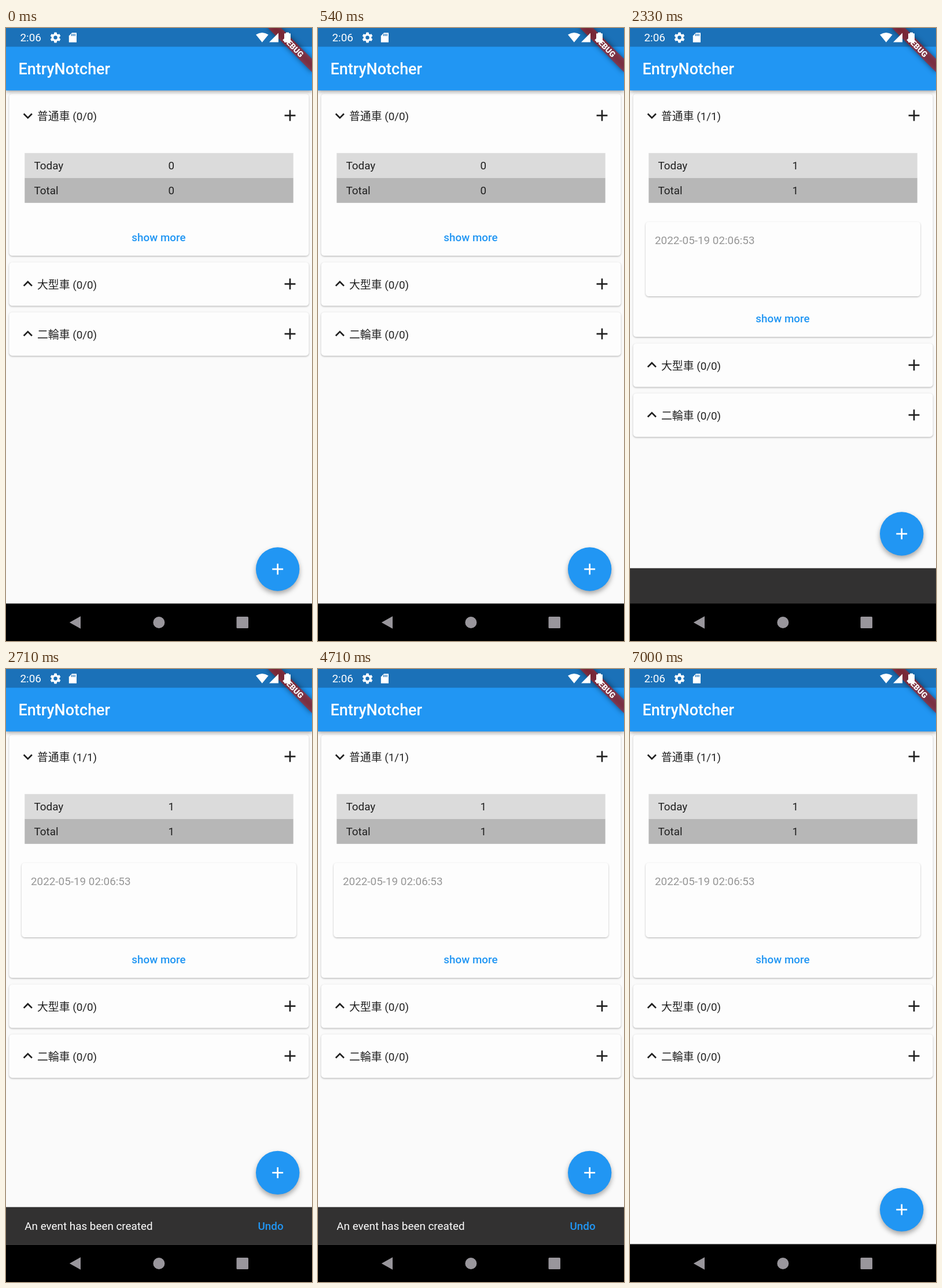
An HTML page with a canvas that plays this animation: 529x1058 px, repeating every 7040 ms.

```html
<!DOCTYPE html>
<html lang="ja">
<head>
<meta charset="utf-8">
<title>EntryNotcher</title>
<style>
  html, body { margin: 0; width: 100%; height: 100%; overflow: hidden; background: #000; }
  canvas { display: block; width: 529px; height: 1058px; }
</style>
</head>
<body>
<canvas id="stage" width="529" height="1058"></canvas>
<script>
const ctx = document.getElementById('stage').getContext('2d');
const W = 529, H = 1058, DP = 1.347, LOOP = 7040;
const STATUS_H = 24 * DP, BAR_H = 80 * DP, NAV_TOP = H - 48 * DP, SNACK_H = 48 * DP;
const ENTER = 1940, LEAVE = 6492, SLIDE = 550;
const BLUE = '#2196f3', INK = '#202020';
const FAMILY = 'Roboto, "Noto Sans CJK JP", "Noto Sans CJK", sans-serif';

const clamp = v => Math.max(0, Math.min(1, v));

// Material standard easing: cubic-bezier(0.4, 0, 0.2, 1)
function ease(x) {
  if (x <= 0 || x >= 1) return clamp(x);
  let lo = 0, hi = 1, s = 0.5;
  for (let i = 0; i < 24; i++) {
    s = (lo + hi) / 2;
    const bx = 1.2 * s * (1 - s) ** 2 + 0.6 * s * s * (1 - s) + s ** 3;
    if (bx < x) lo = s; else hi = s;
  }
  return s * s * (3 - 2 * s);
}

function rect(x, y, w, h, color) {
  ctx.fillStyle = color;
  ctx.fillRect(x, y, w, h);
}

function text(str, x, y, { color = INK, weight = 400, size = 14, align = 'left' } = {}) {
  ctx.font = `${weight} ${size * DP}px ${FAMILY}`;
  ctx.textAlign = align;
  ctx.textBaseline = 'alphabetic';
  ctx.fillStyle = color;
  ctx.fillText(str, x, y);
}

function withShadow(alpha, blur, dy, draw) {
  ctx.save();
  ctx.shadowColor = `rgba(0,0,0,${alpha})`;
  ctx.shadowBlur = blur;
  ctx.shadowOffsetY = dy;
  draw();
  ctx.restore();
}

function polygon(points, color) {
  ctx.fillStyle = color;
  ctx.beginPath();
  points.forEach(([x, y]) => ctx.lineTo(x, y));
  ctx.closePath();
  ctx.fill();
}

function roundRect(x, y, w, h, r, color) {
  ctx.fillStyle = color;
  ctx.beginPath();
  ctx.roundRect(x, y, w, h, r);
  ctx.fill();
}

function disc(x, y, r, color) {
  ctx.fillStyle = color;
  ctx.beginPath();
  ctx.arc(x, y, r, 0, Math.PI * 2);
  ctx.fill();
}

function plus(x, y, color) {
  const half = 7 * DP, thick = 2 * DP;
  rect(x - half, y - thick / 2, half * 2, thick, color);
  rect(x - thick / 2, y - half, thick, half * 2, color);
}

function chevron(x, y, dir) {
  ctx.strokeStyle = INK;
  ctx.lineWidth = 2 * DP;
  ctx.beginPath();
  ctx.moveTo(x - 7.1, y - 3.5 * dir);
  ctx.lineTo(x, y + 3.6 * dir);
  ctx.lineTo(x + 7.1, y - 3.5 * dir);
  ctx.stroke();
}

function card(x, y, w, h) {
  withShadow(0.28, 3, 1.2, () => roundRect(x, y, w, h, 5.4, '#fdfdfd'));
}

function counterCard(name, count, y, h, open) {
  card(5.4, y, 518.2, h);
  const mid = y + 37.7;
  chevron(37.8, mid + (open ? 0.3 : -0.4), open ? 1 : -1);
  text(`${name} (${count}/${count})`, 54, mid + 8);
  plus(491, mid - 0.2, INK);
}

function tableRow(label, value, y, color) {
  rect(32.3, y, 464.4, 43, color);
  text(label, 48.5, y + 28.2);
  text(value, 280.5, y + 28.2);
}

function page(created) {
  const shift = created ? 140 : 0, count = created ? 1 : 0;
  rect(0, 0, W, H, '#fafafa');
  counterCard('普通車', count, 113.5, 279.5 + shift, true);
  tableRow('Today', count, 215.8, '#dbdbdb');
  tableRow('Total', count, 258.8, '#b7b7b7');
  if (created) {
    card(27, 334.5, 475, 128.5);
    text('2022-05-19 02:06:53', 43, 373.2, { color: '#969696' });
  }
  text('show more', 264, 368 + shift, { color: BLUE, weight: 500, align: 'center' });
  counterCard('大型車', 0, 404.3 + shift, 75.3, false);
  counterCard('二輪車', 0, 490.4 + shift, 75.3, false);
}

function appBar() {
  withShadow(0.4, 7, 2.5, () => rect(0, 0, W, BAR_H, BLUE));
  rect(0, 0, W, STATUS_H, '#1b71b8');
  text('EntryNotcher', 21.6, 80.3, { color: '#fff', weight: 500, size: 20 });
}

function snackBar(height, opacity) {
  if (height <= 0) return;
  const top = NAV_TOP - height;
  rect(0, top, W, SNACK_H, '#323131');
  ctx.globalAlpha = opacity;
  text('An event has been created', 32.3, top + 39.5, { color: '#fff' });
  text('Undo', 435.5, top + 39.5, { color: BLUE, weight: 500 });
  ctx.globalAlpha = 1;
}

function addButton(y) {
  withShadow(0.34, 9, 4.5, () => disc(469.7, y, 28 * DP, BLUE));
  plus(469.7, y, '#fff');
}

function debugRibbon() {
  const half = 40 * DP, top = 28 * DP, h = 12 * DP;
  ctx.save();
  ctx.translate(W, 0);
  ctx.rotate(Math.PI / 4);
  ctx.filter = 'blur(5px)';
  rect(-half, top, half * 2, h, 'rgba(0,0,0,0.5)');
  ctx.filter = 'none';
  rect(-half, top, half * 2, h, 'rgba(183,28,28,0.627)');
  text('DEBUG', 0, top + h / 2 + 4.9, { color: '#fff', weight: 900, size: 10.2, align: 'center' });
  ctx.restore();
}

function gear(x, y) {
  ctx.save();
  ctx.translate(x, y);
  for (let i = 0; i < 6; i++) {
    polygon([[-2.9, -5], [-2, -9], [2, -9], [2.9, -5]], '#fff');
    ctx.rotate(Math.PI / 3);
  }
  ctx.strokeStyle = '#fff';
  ctx.lineWidth = 3.6;
  ctx.beginPath();
  ctx.arc(0, 0, 5, 0, Math.PI * 2);
  ctx.stroke();
  ctx.restore();
}

function statusIcons() {
  text('2:06', 24.5, 23.3, { color: '#fff' });
  gear(85.5, 16.5);

  polygon([[114, 8.3], [122, 8.3], [122, 24.8], [108.8, 24.8], [108.8, 13.5]], '#fff');
  for (let i = 0; i < 3; i++) rect(113 + i * 2.7, 10.2, 1.4, 3.6, '#1b71b8');

  ctx.fillStyle = '#fff';
  ctx.beginPath();
  ctx.moveTo(442.8, 24.8);
  ctx.lineTo(432, 11.6);
  ctx.quadraticCurveTo(442.8, 4.2, 453.6, 11.6);
  ctx.fill();

  polygon([[455, 24.6], [471, 24.6], [471, 8.6]], '#fff');
  rect(484, 7.6, 5, 3, '#fff');
  roundRect(481, 9.2, 11, 15.8, 1, '#fff');
}

function navBar() {
  const grey = '#99969c';
  rect(0, NAV_TOP, W, H - NAV_TOP, '#000');
  polygon([[109.8, 1026], [129, 1015.3], [129, 1036.7]], grey);
  disc(264.4, 1026, 10, grey);
  roundRect(398.5, 1016, 20.5, 20, 1.5, grey);
}

function render(t) {
  const leaving = t >= LEAVE;
  const phase = leaving ? 1 - clamp((t - LEAVE) / SLIDE) : clamp((t - ENTER) / SLIDE);
  const height = SNACK_H * ease(phase);
  const opacity = leaving ? 1 : ease(clamp((phase - 0.72) / 0.28));

  page(t >= ENTER);
  appBar();
  snackBar(height, opacity);
  addButton(934 - height);
  debugRibbon();
  statusIcons();
  navBar();
}

function tick() {
  render(performance.now() % LOOP);
  requestAnimationFrame(tick);
}
tick();
</script>
</body>
</html>
```
